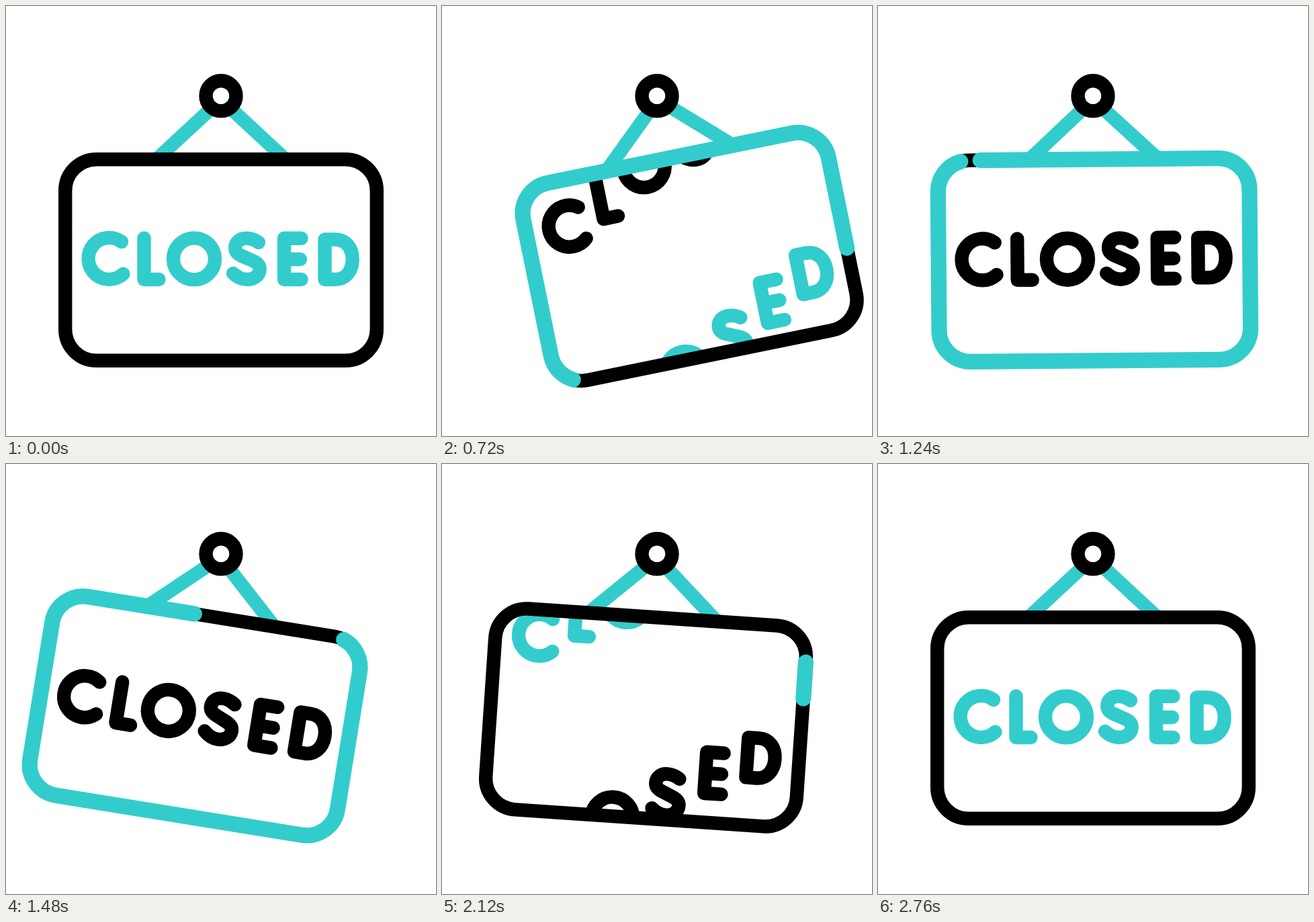
An HTML page with a canvas for the animation above (3000 ms loop, 640 by 640 pixels).

```html
<!DOCTYPE html>
<html lang="en">
<head>
<meta charset="utf-8">
<title>Closed sign</title>
<style>
html, body { margin: 0; width: 100%; height: 100%; overflow: hidden; background: #fff; }
canvas { display: block; }
</style>
</head>
<body>
<canvas id="stage" width="640" height="640"></canvas>
<script>
const ctx = document.getElementById('stage').getContext('2d');
const LOOP = 3000, CYAN = '#33cccc', BLACK = '#000', LINE = 20.4;
const PIVOT = { x: 320, y: 133.8 };
const PERIMETER = 1446.4;

const board = new Path2D();
board.roundRect(88.2, 228.2, 463.6, 299.6, 46.5);

const ring = new Path2D();
ring.arc(PIVOT.x, PIVOT.y, 22.5, 0, Math.PI * 2);

const strings = new Path2D('M310 148.4L226 226.4M330 148.4L414 226.4');

const letters = [
  'M172 351A31 31 0 1 0 174.5 398.8',
  'M205.5 345.5V407H227.5',
  'M311 376.4A31 31 0 1 1 249 376.4A31 31 0 1 1 311 376.4Z',
  'M376 352C370 347.5 364 345.7 357.5 345.7C348 345.7 341.3 351.5 341.3 360C341.3 366.5 346 370 352 372.5' +
    'L367 379C374 382 377.7 386 377.7 391.5C377.7 401 369 407 359 407C351 407 344 403.5 338 398',
  'M439.5 345.7H414V407H439.5M414 377H438',
  'M474.5 347.5H490C506 347.5 515.7 360 515.7 377S506 407 490 407H474.5Z'
].map(d => new Path2D(d));

// cubic-bezier(.5, 0, .2, 1) running from time a to time b
function ease(t, a, b) {
  const x = Math.min(1, Math.max(0, (t - a) / (b - a)));
  if (x === 0 || x === 1) return x;
  let lo = 0, hi = 1;
  for (let i = 0; i < 24; i++) {
    const s = (lo + hi) / 2, r = 1 - s;
    if (1.5 * r * r * s + 0.6 * r * s * s + s * s * s < x) lo = s; else hi = s;
  }
  return lo * lo * (3 - 2 * lo);
}

function stroke(path, color, width = LINE) {
  ctx.strokeStyle = color;
  ctx.lineWidth = width;
  ctx.stroke(path);
}

const swing = t =>
  -12 * ease(t, 200, 890) + 23 * ease(t, 915, 1755) - 11 * ease(t, 1755, 2575);

function drawLetter(path, color, dy) {
  if (Math.abs(dy) >= 200) return;
  ctx.save();
  ctx.translate(0, dy);
  stroke(path, color);
  ctx.restore();
}

function drawLetters(t) {
  ctx.save();
  ctx.clip(board);
  letters.forEach((path, i) => {
    const local = t - i * 40;
    const leave = start => 316 * ease(local, start, start + 940);
    const enter = start => 200 * (ease(local, start, start + 690) - 1);
    drawLetter(path, CYAN, leave(265));
    const blackIn = enter(425);
    drawLetter(path, BLACK, blackIn + leave(1681));
    drawLetter(path, CYAN, enter(1865));
  });
  ctx.restore();
}

function drawTrim(t) {
  const tail = ease(t, 1160, 2420), head = ease(t, 160, 1440);
  if (head - tail <= 0) return;
  const late = Math.max(0, t - 1300);
  const offset = 0.447 + 0.00045 * t - 8e-8 * late * late;
  const length = (head - tail) * PERIMETER;
  ctx.save();
  ctx.setLineDash([length, PERIMETER - length]);
  ctx.lineDashOffset = -((offset + tail) % 1) * PERIMETER;
  stroke(board, CYAN, 23.2);
  ctx.restore();
}

function draw(t) {
  ctx.fillStyle = '#fff';
  ctx.fillRect(0, 0, 640, 640);
  ctx.save();
  ctx.translate(PIVOT.x, PIVOT.y);
  ctx.rotate(swing(t) * Math.PI / 180);
  ctx.translate(-PIVOT.x, -PIVOT.y);
  ctx.lineCap = 'butt';
  stroke(strings, CYAN);
  ctx.fill(board);
  ctx.lineCap = ctx.lineJoin = 'round';
  drawLetters(t);
  stroke(board, BLACK);
  drawTrim(t);
  ctx.restore();
  ctx.fill(ring);
  stroke(ring, BLACK);
}

const begin = performance.now();
function tick() {
  draw((performance.now() - begin) % LOOP);
  requestAnimationFrame(tick);
}
tick();
</script>
</body>
</html>
```
